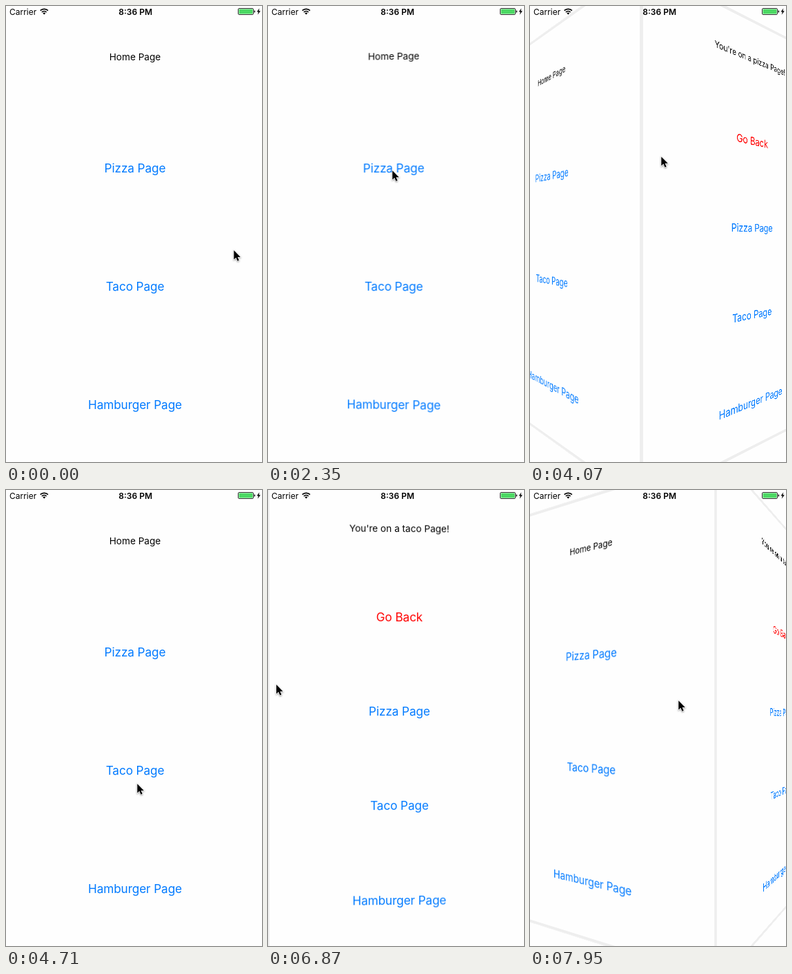
Write an HTML page that moves like this. It is 371 px wide and 663 px high and loops after 8000 ms.

```html
<!DOCTYPE html>
<html lang="en">
<head>
<meta charset="utf-8">
<style>
  html, body { margin: 0; width: 100%; height: 100%; overflow: hidden; background: #fefefe; }
  body { position: relative; font-family: Inter, sans-serif; color: #000; }
  .page {
    position: absolute; left: -.5px; top: -1.7px; width: 375px; height: 667px;
    display: flex; flex-direction: column; justify-content: space-around; align-items: center;
    background: #fefefe; box-shadow: 0 0 0 4.5px #eee;
  }
  .page p { margin: 0; font-size: 17.2px; line-height: 37px; letter-spacing: -.1px; color: #007aff; }
  .page .title { font-size: 13.6px; line-height: 17px; letter-spacing: 0; color: #000; }
  .page .back { color: #f00; }
  svg { position: absolute; left: 0; top: 0; overflow: visible; }
  svg text { font-size: 12px; }
  #cursor { filter: drop-shadow(0 1px 1px #0006); }
</style>
</head>
<body>
<div class="page" id="home">
  <p class="title">Home Page</p>
  <p id="pizza">Pizza Page</p>
  <p id="taco">Taco Page</p>
  <p>Hamburger Page</p>
</div>
<div class="page" id="detail">
  <p class="title" id="title"></p>
  <p class="back" id="back">Go Back</p>
  <p>Pizza Page</p>
  <p>Taco Page</p>
  <p>Hamburger Page</p>
</div>

<svg width="371" height="20">
  <text x="5" y="12.5">Carrier</text>
  <path d="M49.7 6.6a8 8 0 0 1 11.2 0M51.9 9a4.9 4.9 0 0 1 6.8 0" fill="none" stroke="#000" stroke-width="1.7"/>
  <path d="M55.3 12.6l-2-2.2a2.9 2.9 0 0 1 4 0z"/>
  <text x="187.7" y="12.5" text-anchor="middle" font-weight="600">8:36 PM</text>
  <rect x="336.5" y="3.5" width="22" height="9" rx="1.5" fill="none" stroke="#333"/>
  <rect x="337.5" y="4.5" width="20" height="7" rx=".5" fill="#4cd964"/>
  <path d="M359.6 6.3q1.6.2 1.6 1.7t-1.6 1.7z"/>
  <path d="M367.3 3.2l-3.8 5.4h2.3l-1.2 4.2 4.2-5.6h-2.4z"/>
</svg>

<svg id="cursor" width="12" height="18">
  <path d="M.3.3V13.5L3.4 10.7L5.5 15.7L7.7 14.8L5.6 9.9H9.8Z"
        stroke="#fff" stroke-width="1.4" paint-order="stroke"/>
</svg>

<script>
const LOOP = 8000, WIDTH = 375;
const $ = id => document.getElementById(id);

const START = { x: 330, y: 355 };
// Each move glides on from the last stop; dx and dy bow its path.
const MOVES = [
  { at: 650, lasts: 950, x: 180, y: 239, dy: 82 },
  { at: 3050, lasts: 200, x: 190, y: 186, dx: 7 },
  { at: 3870, lasts: 770, x: 190, y: 427 },
  { at: 4710, lasts: 300, x: 190, y: 406 },
  { at: 5290, lasts: 850, x: 8, y: 289 },
  { at: 6800, lasts: 740, x: 215, y: 306, dy: -22 }
];

const fraction = (t, start, duration) => Math.min(1, Math.max(0, (t - start) / duration));

function ease(t, start, duration = 510) {
  const f = fraction(t, start, duration);
  return f < .5 ? 2 * f * f : 1 - 2 * (1 - f) ** 2;
}

function pointerAt(t) {
  let { x, y } = START;
  for (const { at, lasts, x: toX, y: toY, dx = 0, dy = 0 } of MOVES) {
    const eased = ease(t, at, lasts);
    const bow = Math.sin(Math.PI * fraction(t, at, lasts));
    x += (toX - x) * eased + dx * bow;
    y += (toY - y) * eased + dy * bow;
  }
  return { x, y };
}

// 0 shows the home page, 1 the detail page
function progressAt(t) {
  const tapped = ease(t, 2306) - ease(t, 3830) + ease(t, 5245);
  const dragged = 1 - .468 * ease(t, 6800, 740);
  const released = 1 - ease(t, 7694, 560);
  return tapped * dragged * released;
}

function turn(page, offset) {
  const reach = (WIDTH + 1) * offset;
  page.style.visibility = Math.abs(offset) < 1 ? 'visible' : 'hidden';
  page.style.transform = offset ? `perspective(${WIDTH}px) translateX(${reach / 2}px)
    rotateY(${60 * offset}deg) translateX(${reach / 2.38}px)` : 'none';
}

function press(label, t, from, to) {
  label.style.opacity = t >= from && t < to ? .2 : 1;
}

function draw() {
  const t = performance.now() % LOOP;
  const { x, y } = pointerAt(t);
  const progress = progressAt(t);
  $('cursor').style.transform = `translate(${x}px, ${y}px)`;
  $('title').textContent = `You're on a ${t < 4800 ? 'pizza' : 'taco'} Page!`;
  press($('pizza'), t, 2060, 2306);
  press($('back'), t, 3640, 3830);
  press($('taco'), t, 5060, 5245);
  turn($('home'), -progress);
  turn($('detail'), 1 - progress);
  requestAnimationFrame(draw);
}
draw();
</script>
</body>
</html>
```
